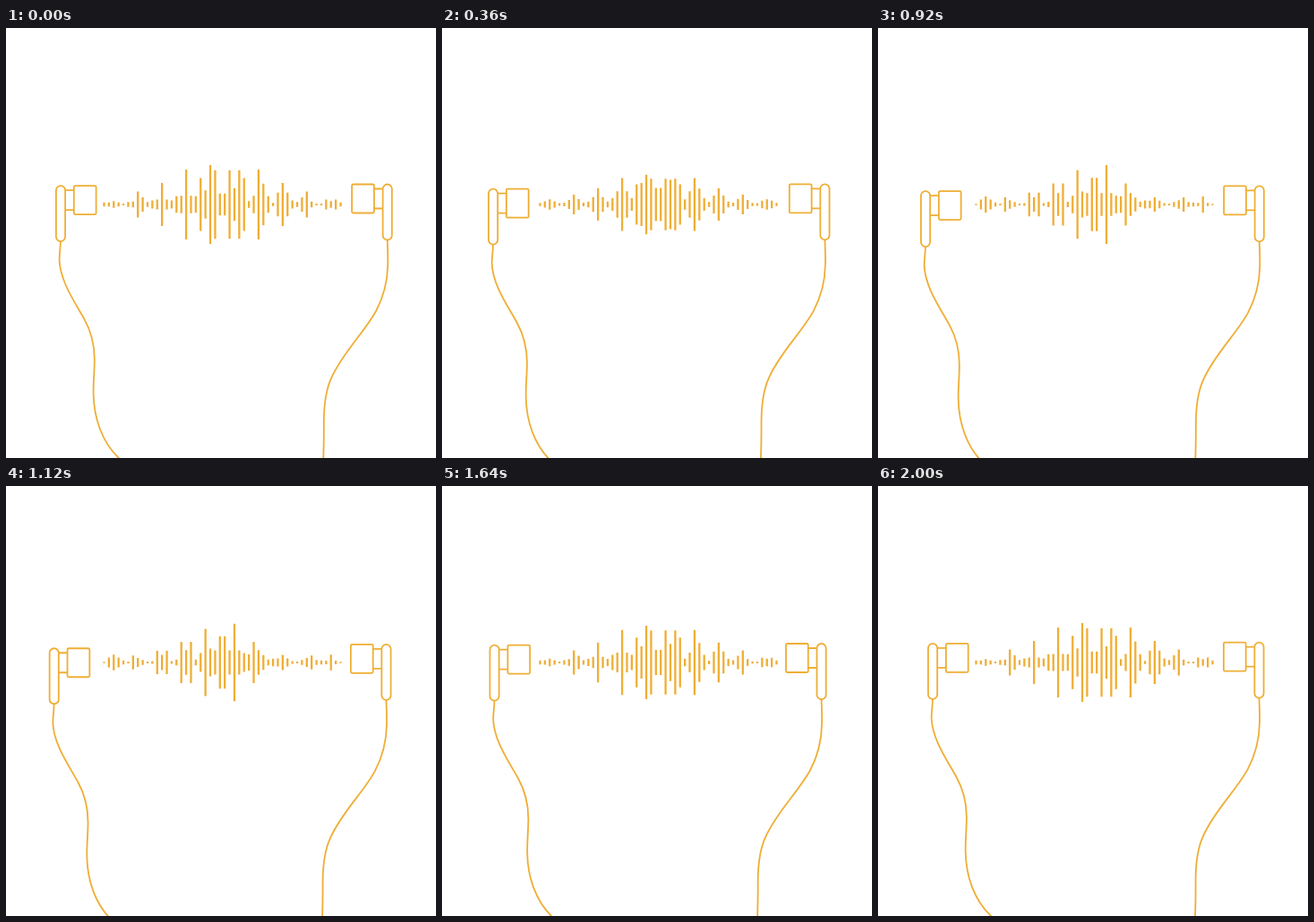
An HTML page that plays this animation: 480x480 px, repeating every 2040 ms.

```html
<!DOCTYPE html>
<html lang="en">
<head>
<meta charset="utf-8">
<title>Earphones and sound wave</title>
<style>
  html, body { margin: 0; width: 100%; height: 100%; overflow: hidden; background: #fff; }
  svg { display: block; width: 100%; height: 100%; }
</style>
</head>
<body>
<svg viewBox="0 0 480 480" fill="none" stroke="#efae35" stroke-width="1.8">
  <defs>
    <g id="bud">
      <rect x="75.8" y="176" width="24.8" height="32" rx="1.5"/>
      <path d="M66 181H75.8M66 203H75.8"/>
      <rect x="55.9" y="176" width="10.2" height="62" rx="5.1"/>
    </g>
  </defs>
  <path id="wave" stroke-width="2.3"/>
  <g id="left">
    <use href="#bud"/>
    <path d="M60.8 238C61 246 59.6 250 59.6 259C60.5 283 77 306 87.5 325C95 338.5 98.8 351 98.8 370C98.8 383 97.4 395 97.6 408C98 435 107 462 126 480L132 486"/>
  </g>
  <g id="right">
    <use href="#bud" transform="matrix(-1 0 0 1 486.8 -1.7)"/>
    <path d="M425.8 236.3C426 244 426.6 254 426.3 264C426 284 421.5 300 413 316C399 341 376 362 363.5 390C356 406 354.8 424 354.9 442C355 455 355 464 354.2 484"/>
  </g>
</svg>
<script>
const LOOP = 2040, STEP = 40, BARS = 50;
const $ = id => document.getElementById(id);

// The wave is mirrored; each half is a row of five-bar humps: [peak, falloff]
const humps = [[9, .62], [14.5, .55], [24, .55], [39, .6], [44, .87]];
// Bars that grow while the others shrink
const rising = new Set([1, 2, 3, 4, 6, 11, 13, 16, 18, 21, 24, 25, 27, 30, 31, 35, 43, 44, 45, 47]);

const easeInOut = x => x < .5 ? 4 * x ** 3 : 1 - 4 * (1 - x) ** 3;
const lerp = (a, b, u) => a + (b - a) * u;
const swing = (t, peak, cycles = 1) => Math.cos(2 * Math.PI * cycles * (t - peak) / LOOP);

function barHeight(i) {
  const k = Math.min(i, BARS - 1 - i);
  const [peak, falloff] = humps[Math.floor(k / 5)];
  return peak * falloff ** Math.abs(k % 5 - 2) ** 1.5;
}

function wavePath(t) {
  const phase = (t + 100) % LOOP / (LOOP / 2);
  const mix = phase < 1 ? easeInOut(phase) : 1 - easeInOut(phase - 1);
  return Array.from({ length: BARS }, (_, i) => {
    const scale = rising.has(i) ? lerp(.41, 1, mix) : lerp(1, .33, mix);
    const half = barHeight(i) * scale;
    return `M${109.5 + i * 5.388} ${197 - half}v${2 * half}`;
  }).join("");
}

function move(id, x, y) {
  $(id).setAttribute("transform", `translate(${x} ${y})`);
}

function draw(t) {
  const wobble = .5 * swing(t, 0, 2);
  $("wave").setAttribute("d", wavePath(t));
  move("left", -4.35 - 4 * swing(t, 930) + wobble, 3.4 + 3.15 * swing(t, 870) - wobble);
  move("right", -.4 + 2.1 * swing(t, 460), 1.3 + 1.35 * swing(t, 1230));
}

const start = performance.now();
function tick() {
  const t = (performance.now() - start) % LOOP;
  draw(Math.floor(t / STEP) * STEP);
  requestAnimationFrame(tick);
}
tick();
</script>
</body>
</html>
```
